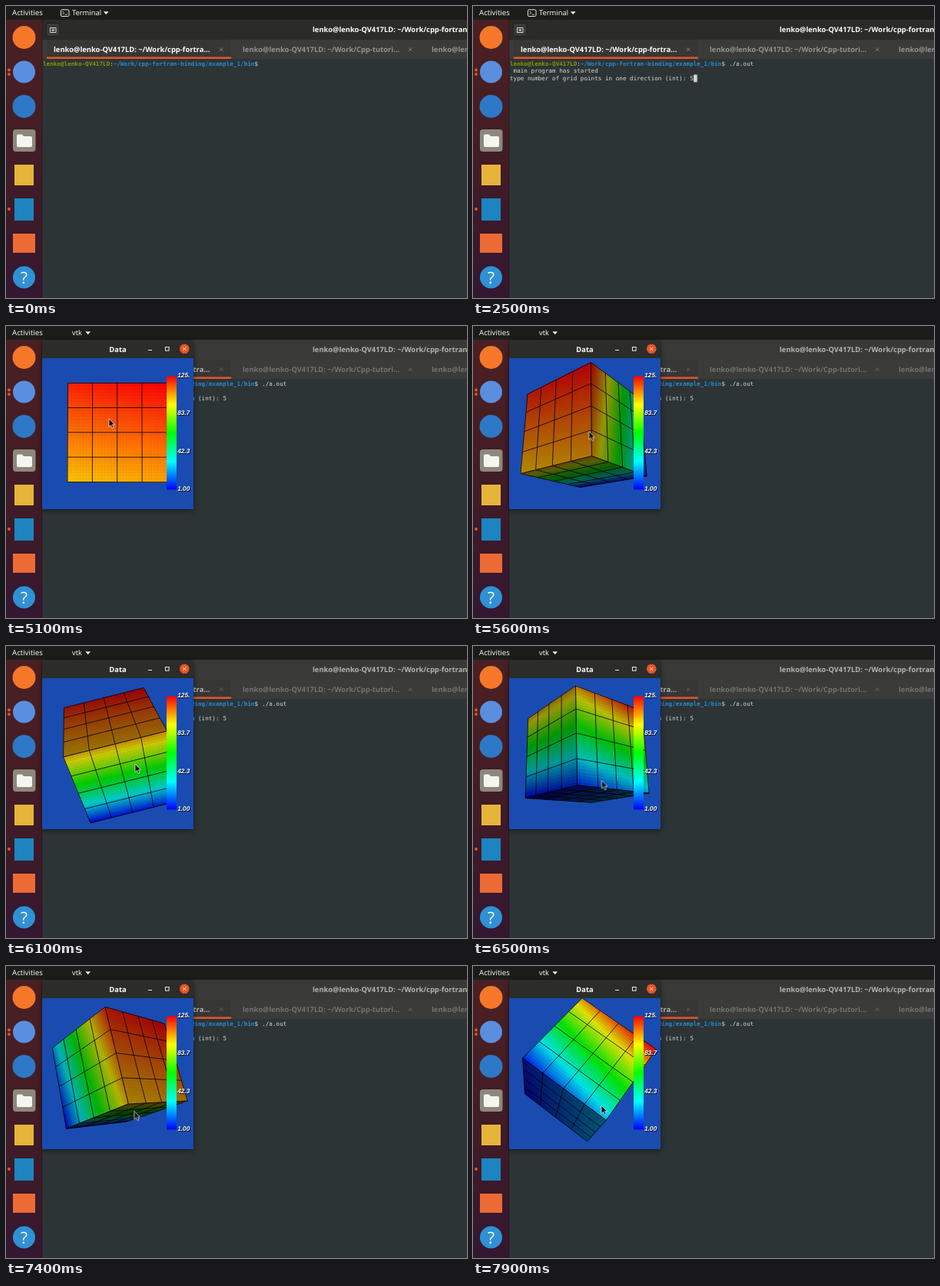
Write an HTML page with a canvas that moves like this. It is 600 px wide and 381 px high and loops after 8000 ms.

```html
<!DOCTYPE html>
<html lang="en">
<head>
<meta charset="utf-8">
<title>Terminal and cube viewer</title>
<style>
html, body { margin: 0; width: 100%; height: 100%; overflow: hidden; background: #2d3436; }
#stage { position: relative; width: 600px; height: 381px; overflow: hidden; }
#stage > svg, #win > svg, #win > canvas { position: absolute; left: 0; top: 0; display: block; }
text { text-rendering: geometricPrecision; white-space: pre; }
.ui { font-family: "Open Sans", "Noto Sans", sans-serif; font-size: 9.4px; fill: #fff; }
.bold { font-weight: 700; }
.mono { font-family: "DejaVu Sans Mono", monospace; font-size: 7.64px; fill: #d6dad4; }
.user { fill: #859900; font-weight: 700; }
.path { fill: #268bd2; font-weight: 700; }
.off { fill: #93938f; }
.legend { font: italic 700 8.3px "Liberation Sans", Arial, sans-serif; fill: #fff; }
.legend .shade { fill: #000; }

.step { animation: 8s step-end infinite; }
.command { animation-name: command; }
.output { animation-name: output; }
.answer { animation-name: answer; }
.caret { animation-name: caret; }
.focused { animation-name: focused; }
.blurred { animation-name: blurred; }
.backdrop { animation-name: backdrop; }
.mouse { animation-name: mouse; }

@keyframes command { 0% { opacity: 0 } 5%, 100% { opacity: 1 } }
@keyframes output { 0% { opacity: 0 } 12.5%, 100% { opacity: 1 } }
@keyframes answer { 0% { opacity: 0 } 31.25%, 100% { opacity: 1 } }
@keyframes focused { 0% { opacity: 1 } 42.5%, 100% { opacity: 0 } }
@keyframes blurred { 0% { opacity: 0 } 42.5%, 100% { opacity: 1 } }
@keyframes backdrop { 0% { opacity: 1 } 42.5%, 100% { opacity: .62 } }
@keyframes caret {
  0% { opacity: 0; transform: translate(333.2px, 70px) }
  2.5% { opacity: 1; transform: translate(333.2px, 70px) }
  5% { opacity: 1; transform: translate(365.4px, 70px) }
  12.5% { opacity: 1; transform: translate(282.6px, 89.6px) }
  20% { opacity: 0; transform: translate(282.6px, 89.6px) }
  27.5% { opacity: 1; transform: translate(282.6px, 89.6px) }
  31.25% { opacity: 1; transform: translate(287.2px, 89.6px) }
  38.75%, 100% { opacity: 1; transform: translate(48px, 99.4px) }
}
@keyframes open {
  0% { opacity: 0; transform: scale(.2) }
  40% { opacity: .6; transform: scale(.8) }
  41.25% { opacity: .95; transform: scale(.97) }
  42.5%, 100% { opacity: 1; transform: none }
}
@keyframes mouse {
  0% { opacity: 0; transform: translate(364px, 196px) }
  53.75% { opacity: 1; transform: translate(364px, 196px); animation-timing-function: steps(6) }
  61.25% { opacity: 1; transform: translate(131px, 115px) }
  63.75% { opacity: 1; transform: translate(134px, 121px); animation-timing-function: steps(10) }
  76.25% { opacity: 1; transform: translate(168px, 154px); animation-timing-function: steps(8) }
  86.25% { opacity: 1; transform: translate(167px, 197px); animation-timing-function: steps(10) }
  98.75%, 100% { opacity: 1; transform: translate(167px, 182px) }
}

#win {
  position: absolute; left: 47px; top: 18px; width: 197px; height: 221px;
  border-radius: 6px 6px 0 0; overflow: hidden; background: #1a4bb0;
  box-shadow: 0 2px 7px rgba(0, 0, 0, .45), 0 0 1px #000;
  transform-origin: 50% 100%; animation: open 8s step-end infinite;
}
#win > canvas { top: 24px; width: 197px; height: 197px; }
</style>
</head>
<body>
<div id="stage">
  <svg width="600" height="381" viewBox="0 0 600 381">
    <defs>
      <linearGradient id="dock" x2="0" y2="1">
        <stop offset="0" stop-color="#4a2022"/><stop offset=".5" stop-color="#421c26"/><stop offset="1" stop-color="#341730"/>
      </linearGradient>
    </defs>
    <rect width="600" height="381" fill="#2d3436"/>

    <!-- terminal header and tabs -->
    <rect x="47" y="17" width="553" height="27" fill="#2b2b2a"/>
    <rect class="step blurred" x="47" y="17" width="553" height="27" fill="#393937"/>
    <rect x="47" y="44" width="553" height="25" fill="#3b3b39"/>
    <rect x="53" y="44" width="240" height="25" fill="#373735"/>
    <rect x="53" y="66.4" width="240" height="2.6" fill="#e2532a"/>
    <g class="step backdrop">
      <rect x="52.5" y="22.5" width="17.5" height="17" rx="3" fill="#3a3a38" stroke="#1f1f1e"/>
      <path d="M57.5 34.5v-6h7.5v6zM61.2 29.5v4M59.2 31.5h4" fill="none" stroke="#e8e8e6" stroke-width=".9"/>
      <text class="ui bold" x="399" y="34">lenko@lenko-QV417LD: ~/Work/cpp-fortran-binding/example_1/bin</text>
      <text class="ui bold" x="62" y="60">lenko@lenko-QV417LD: ~/Work/cpp-fortra...</text>
      <g class="ui bold">
        <text class="off" x="308" y="60">lenko@lenko-QV417LD: ~/Work/Cpp-tutori...</text>
        <text class="off" x="554" y="60">lenko@lenko-QV417LD: ~/Work</text>
      </g>
      <path d="M278 54.5l4.5 4.5m0-4.5l-4.5 4.5M524 54.5l4.5 4.5m0-4.5l-4.5 4.5" stroke="#8a8a86" stroke-width=".9"/>
    </g>

    <!-- terminal text -->
    <g class="mono">
      <text x="48" y="77.5"><tspan class="user">lenko@lenko-QV417LD</tspan>:<tspan class="path">~/Work/cpp-fortran-binding/example_1/bin</tspan>$</text>
      <text class="step command" x="333.2" y="77.5">./a.out</text>
      <g class="step output">
        <text x="52.6" y="87.3">main program has started</text>
        <text x="48" y="97.1">type number of grid points in one direction (int):</text>
      </g>
      <text class="step answer" x="282.6" y="97.1">5</text>
    </g>
    <rect class="step caret" width="4.6" height="9.6" fill="#d6dad4"/>

    <!-- dock -->
    <rect y="17" width="47" height="364" fill="url(#dock)"/>
    <rect x="46.5" y="17" width="1" height="364" fill="#1e1a1e" opacity=".6"/>
    <circle cx="23.5" cy="41" r="15" fill="#f5782a"/>
    <circle cx="23.5" cy="86" r="14.5" fill="#5a8fdf"/>
    <circle cx="23.5" cy="131" r="15" fill="#2d79c7"/>
    <rect x="9" y="161" width="29.5" height="29" rx="4" fill="#8d887c"/>
    <path d="M14 169.5q0-2 2-2h5l2 2.5h9q2 0 2 2v10q0 2-2 2h-16q-2 0-2-2z" fill="#f6f4f0"/>
    <rect x="11" y="207" width="25" height="27" fill="#e6b43a"/>
    <rect x="11" y="251" width="25" height="29" fill="#1c84bf"/>
    <rect x="9" y="297" width="29" height="25" fill="#ec6a34"/>
    <circle cx="23.5" cy="354" r="14.5" fill="#2f92d6"/>
    <text x="23.5" y="361.5" text-anchor="middle" class="ui" style="font-size:21px">?</text>
    <g fill="#e95420"><circle cx="4" cy="83.5" r="1.9"/><circle cx="4" cy="89" r="1.9"/><circle cx="4" cy="265" r="1.9"/></g>

    <!-- top bar -->
    <rect width="600" height="18" fill="#1d1c1a"/>
    <g class="ui">
      <text x="8" y="12.3" style="font-size:9.7px">Activities</text>
      <g class="step focused">
        <rect x="71.5" y="4.8" width="10.5" height="8.7" rx="1.5" fill="none" stroke="#e6e6e4"/>
        <path d="M73.6 7l2 2-2 2M76.7 11.2h3" fill="none" stroke="#e6e6e4" stroke-width=".9"/>
        <text x="86" y="12.3">Terminal</text>
        <path d="M127 7.3h6.5l-3.25 3.8z"/>
      </g>
      <g class="step blurred">
        <text x="86" y="12.3">vtk</text>
        <path d="M103.5 7.3h6.5l-3.25 3.8z"/>
      </g>
    </g>
  </svg>

  <div id="win">
    <canvas id="view"></canvas>
    <svg width="197" height="221" viewBox="0 0 197 221">
      <defs>
        <linearGradient id="scale" x2="0" y2="1">
          <stop offset="0" stop-color="#f00"/><stop offset=".25" stop-color="#ff0"/><stop offset=".5" stop-color="#0f0"/>
          <stop offset=".75" stop-color="#0ff"/><stop offset="1" stop-color="#00f"/>
        </linearGradient>
      </defs>
      <rect width="197" height="24" fill="#2c2c2a"/>
      <text class="ui bold" x="98.5" y="15.5" text-anchor="middle">Data</text>
      <path d="M138 13.5h5" stroke="#eee"/>
      <rect x="160.5" y="9.5" width="4.6" height="4.6" fill="none" stroke="#eee"/>
      <circle cx="185.3" cy="11.8" r="6.3" fill="#e95420"/>
      <path d="M183.2 9.7l4.2 4.2m0-4.2l-4.2 4.2" stroke="#fff" stroke-width=".9"/>
      <rect x="162" y="47.5" width="13" height="148" fill="url(#scale)"/>
      <g id="labels" class="legend"></g>
    </svg>
  </div>

  <svg width="600" height="381" viewBox="0 0 600 381">
    <path class="step mouse" d="M0 0v10.6l2.5-2.2 1.6 3.7 1.9-.8-1.6-3.6h3.2z" fill="#111" stroke="#f2f2f2" stroke-width=".7"/>
  </svg>
</div>

<script>
const LOOP = 8000, SIZE = 197, DIST = 3.346, FOCAL = 367.6;
const CX = 98.5, CY = 98.3, CELLS = 4, FINE = 32;

// Time, then quaternion w x y z; the signs choose the way round.
const poses = [
  [5000, 1, 0, 0, 0],
  [5100, 1, -.0115, -.006, 0],
  [5600, .922, -.179, -.336, .065],
  [6100, .887, -.438, -.056, .109],
  [6900, -.027, -.699, -.506, -.511],
  [7900, -.195, .737, .410, .496]
].map(([t, ...q]) => ({ t, q: unit(q) }));

const canvas = document.getElementById('view');
const ctx = canvas.getContext('2d');
const ratio = window.devicePixelRatio || 1;
canvas.width = canvas.height = SIZE * ratio;
ctx.scale(ratio, ratio);
ctx.lineJoin = 'round';

document.getElementById('labels').innerHTML = ['125.', '83.7', '42.3', '1.00'].map((s, i) => {
  const y = 49 + 49.4 * i;
  return `<text class="shade" x="176.9" y="${y + .7}">${s}</text><text x="176.2" y="${y}">${s}</text>`;
}).join('');

function unit(q) {
  const n = Math.hypot(...q);
  return q.map(v => v / n);
}

function slerp(a, b, k) {
  const dot = a.reduce((sum, v, i) => sum + v * b[i], 0);
  const angle = Math.acos(Math.max(-1, Math.min(1, dot)));
  if (angle < .02) return unit(a.map((v, i) => v + (b[i] - v) * k));
  const ka = Math.sin((1 - k) * angle), kb = Math.sin(k * angle);
  return unit(a.map((v, i) => v * ka + b[i] * kb));
}

function poseAt(t) {
  const next = poses.findIndex(p => p.t > t);
  if (next === 0) return poses[0].q;
  if (next < 0) return poses[poses.length - 1].q;
  const a = poses[next - 1], b = poses[next];
  return slerp(a.q, b.q, (t - a.t) / (b.t - a.t));
}

// Object axes as seen by the camera.
function axesOf([w, x, y, z]) {
  return [
    [1 - 2 * (y * y + z * z), 2 * (x * y + w * z), 2 * (x * z - w * y)],
    [2 * (x * y - w * z), 1 - 2 * (x * x + z * z), 2 * (y * z + w * x)],
    [2 * (x * z + w * y), 2 * (y * z - w * x), 1 - 2 * (x * x + y * y)]
  ];
}

function project(p, axes) {
  const [x, y, z] = [0, 1, 2].map(i => p[0] * axes[0][i] + p[1] * axes[1][i] + p[2] * axes[2][i]);
  const k = FOCAL / (DIST - z);
  return [CX + x * k, CY - y * k];
}

// The data counts the grid points: x fastest, z slowest.
function colour([x, y, z], light) {
  const value = (4 * (x + .5) + 20 * (y + .5) + 100 * (z + .5)) / 124;
  return `hsl(${240 * (1 - value)}, 100%, ${50 * light}%)`;
}

function trace(points) {
  ctx.beginPath();
  points.forEach(p => ctx.lineTo(p[0], p[1]));
}

function drawFace(axis, side, axes) {
  const facing = side * axes[axis][2];
  if (facing * DIST <= .5) return;
  const at = (u, v) => {
    const p = [];
    p[axis] = side / 2;
    p[(axis + 1) % 3] = u - .5;
    p[(axis + 2) % 3] = v - .5;
    return p;
  };
  const spot = (u, v) => project(at(u, v), axes);
  const d = 1 / FINE;
  ctx.lineWidth = .5;
  for (let i = 0; i < FINE; i++) {
    for (let j = 0; j < FINE; j++) {
      const u = i * d, v = j * d;
      ctx.fillStyle = ctx.strokeStyle = colour(at(u + d / 2, v + d / 2), facing);
      trace([spot(u, v), spot(u + d, v), spot(u + d, v + d), spot(u, v + d)]);
      ctx.closePath();
      ctx.fill();
      ctx.stroke();
    }
  }
  ctx.strokeStyle = '#000';
  ctx.lineWidth = .8;
  for (let i = 0; i <= CELLS; i++) {
    const k = i / CELLS;
    trace([spot(k, 0), spot(k, 1)]);
    ctx.stroke();
    trace([spot(0, k), spot(1, k)]);
    ctx.stroke();
  }
}

function draw(t) {
  const axes = axesOf(poseAt(t));
  ctx.fillStyle = '#1a4bb0';
  ctx.fillRect(0, 0, SIZE, SIZE);
  for (const axis of [0, 1, 2]) for (const side of [-1, 1]) drawFace(axis, side, axes);
}

let start, shown = -1;
function tick(now) {
  start ??= now;
  const t = Math.floor(((now - start) % LOOP) / 100) * 100;
  if (t !== shown) draw(shown = t);
  requestAnimationFrame(tick);
}
requestAnimationFrame(tick);
</script>
</body>
</html>
```
